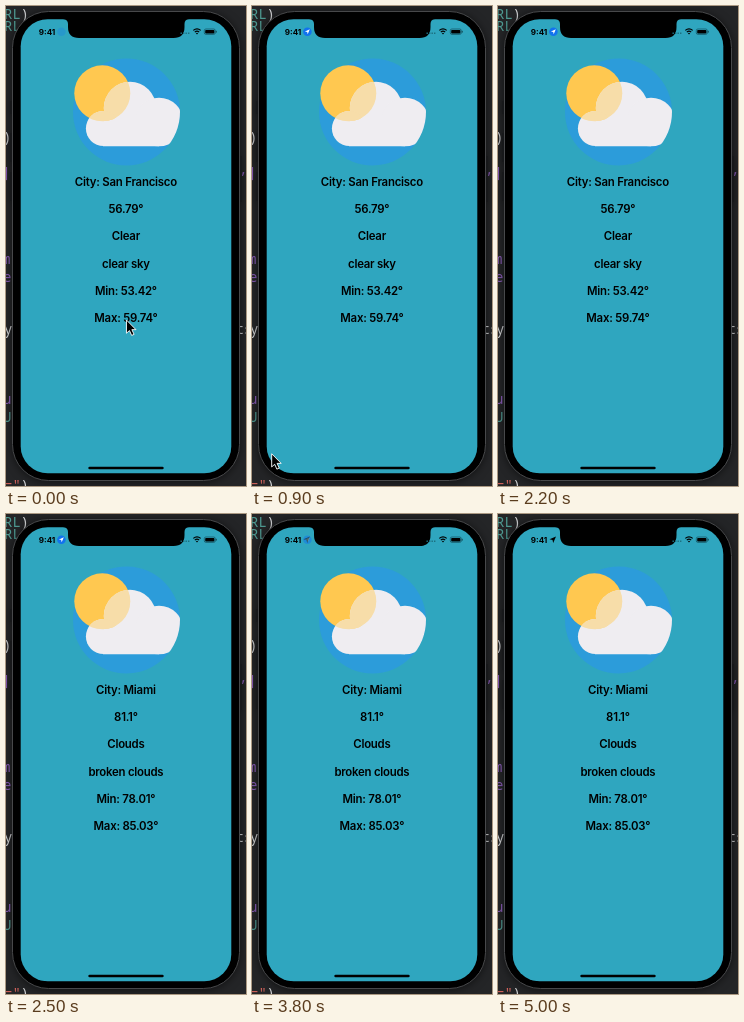
An HTML page for the animation above (5.1 s loop, 240x480 px).

```html
<!DOCTYPE html>
<html lang="en">
<head>
<meta charset="utf-8">
<title>Weather app</title>
<style>
  html, body { margin: 0; width: 100%; height: 100%; overflow: hidden; background: #242527; }
  svg { display: block; }
  .code { font: 14px "Noto Sans Mono", monospace; }
  .label { font: 600 11.4px Inter, sans-serif; letter-spacing: -.23px; text-anchor: middle; }
  .clock { font: 700 8.1px Inter, sans-serif; }
  .body { filter: drop-shadow(0 1px 4px #0008); }
</style>
</head>
<body>
<svg width="240" height="480" viewBox="0 0 240 480">
  <defs>
    <clipPath id="skyClip"><circle cx="120.500" cy="106" r="53.500"/></clipPath>
    <clipPath id="sunClip"><circle cx="96.300" cy="87.300" r="28"/></clipPath>
    <g id="cloud" clip-path="url(#skyClip)">
      <circle cx="124" cy="102" r="26.200"/>
      <circle cx="153" cy="116" r="24.300"/>
      <circle cx="97.500" cy="122.500" r="17.600"/>
      <path d="M97 112H153V140.200H97z"/>
    </g>
    <path id="arrow" d="M3.2-3.2L-3.3-.4L-.3.3L.4 3.3z"/>
  </defs>

  <g id="code" class="code"></g>

  <!-- phone -->
  <g class="body">
    <path d="M5.5 95v13M5.5 127v29M5.5 166v29M234.5 150v46" stroke="#17181a" stroke-width="3"/>
    <rect x="6.5" y="5.5" width="227" height="469" rx="36" stroke="#47484a"/>
  </g>
  <rect x="14.700" y="13.300" width="210.600" height="453.900" rx="27" fill="#2fa6bf"/>
  <path d="M57 13H183Q178.500 13.500 178.500 18V21Q178.500 32 167.500 32H73Q62 32 62 21V18Q62 13.500 57 13z"/>
  <rect x="82.300" y="460.700" width="75.400" height="2.600" rx="1.300"/>

  <!-- status bar -->
  <text class="clock" x="32.700" y="28.700">9:41</text>
  <g id="pill">
    <circle cx="55.400" cy="25.700" r="4.300" fill="#1273ee"/>
    <use id="pillArrow" href="#arrow" transform="translate(55.400 25.700) scale(.75)" fill="#fff"/>
  </g>
  <use id="plainArrow" href="#arrow" transform="translate(54.800 25.700)"/>
  <path d="M174.500 27.300h9" stroke="#1d7080" stroke-width="1.400" stroke-dasharray="1.400 1.100"/>
  <path d="M187.300 24.400Q191 21.200 194.700 24.400M188.800 26.100Q191 24.300 193.200 26.100" fill="none" stroke="#000" stroke-width="1.200"/>
  <path d="M189.900 27.200Q191 26.400 192.100 27.200L191 28.500z"/>
  <rect x="198.300" y="23" width="11" height="5.400" rx="1.600" fill="none" stroke="#14505d" stroke-width=".7"/>
  <rect x="199.200" y="23.900" width="9.200" height="3.600" rx=".8"/>
  <path d="M210.300 24.800v1.800" stroke="#14505d"/>

  <!-- weather icon -->
  <circle cx="120.500" cy="106" r="53.500" fill="#2c9cda"/>
  <circle cx="96.300" cy="87.300" r="28" fill="#ffc850"/>
  <use href="#cloud" fill="#efedf1"/>
  <g clip-path="url(#sunClip)"><use href="#cloud" fill="#f7dda9"/></g>

  <g id="labels" class="label"></g>
  <path id="cursor" d="M0 0V13.200L3 10.500L5.200 15.400L7.600 14.300L5.400 9.600H9.500z" stroke="#fff" stroke-width=".9"/>
</svg>
<script>
const LOOP = 5100, CITY_CHANGE = 2400;
const $ = id => document.getElementById(id);
const clamp = v => Math.min(1, Math.max(0, v));

function addText(parent, x, y, text, fill = '#000') {
  const el = document.createElementNS('http://www.w3.org/2000/svg', 'text');
  Object.entries({ x, y, fill }).forEach(([k, v]) => el.setAttribute(k, v));
  el.textContent = text;
  return parent.appendChild(el);
}

const purple = '#8a5cb8', teal = '#4f9a92', white = '#d0d1d3', red = '#d0625b';
[
  [-2, 13, 'RL', teal], [14.5, 13, ')', white], [-2, 25, 'RL', teal],
  [-3, 136, ')', white], [-4, 171, ']', purple], [233, 168, ',', purple],
  [-4, 258, 'm', purple], [-3, 276, 'e', purple],
  [-2, 328, 'y', white], [229.5, 328, 'ts', white],
  [-3, 398, 'u', purple], [-3, 416, 'U', teal],
  [-2, 484, '="', red], [14.5, 484, ')', white]
].forEach(args => addText($('code'), ...args));

const cities = [
  ['City: San Francisco', '56.79°', 'Clear', 'clear sky', 'Min: 53.42°', 'Max: 59.74°'],
  ['City: Miami', '81.1°', 'Clouds', 'broken clouds', 'Min: 78.01°', 'Max: 85.03°']
];
const labels = cities[0].map((text, i) => addText($('labels'), 119.9, 179.8 + i * 27.3, text));

// Piecewise linear cursor path: time, x, y
const path = [[0, 120.500, 314], [400, 106.500, 331.500], [700, 84, 362], [1000, -12, 490]];

function moveCursor(t) {
  const i = path.findIndex(p => p[0] > t);
  $('cursor').style.display = i < 0 ? 'none' : '';
  if (i < 0) return;
  const [t0, x0, y0] = path[i - 1], [t1, x1, y1] = path[i];
  const k = (t - t0) / (t1 - t0);
  $('cursor').setAttribute('transform', `translate(${x0 + (x1 - x0) * k} ${y0 + (y1 - y0) * k})`);
}

function draw(t) {
  const city = cities[t < CITY_CHANGE ? 0 : 1];
  labels.forEach((el, i) => { el.textContent = city[i]; });

  const fadeOut = clamp((t - 3650) / 300);
  $('pill').style.opacity = clamp(.25 + t / 280) * (1 - fadeOut);
  $('pillArrow').style.opacity = clamp(t / 200);
  $('plainArrow').style.opacity = fadeOut;
  moveCursor(t);
}

(function tick() {
  draw(performance.now() % LOOP);
  requestAnimationFrame(tick);
})();
</script>
</body>
</html>
```
